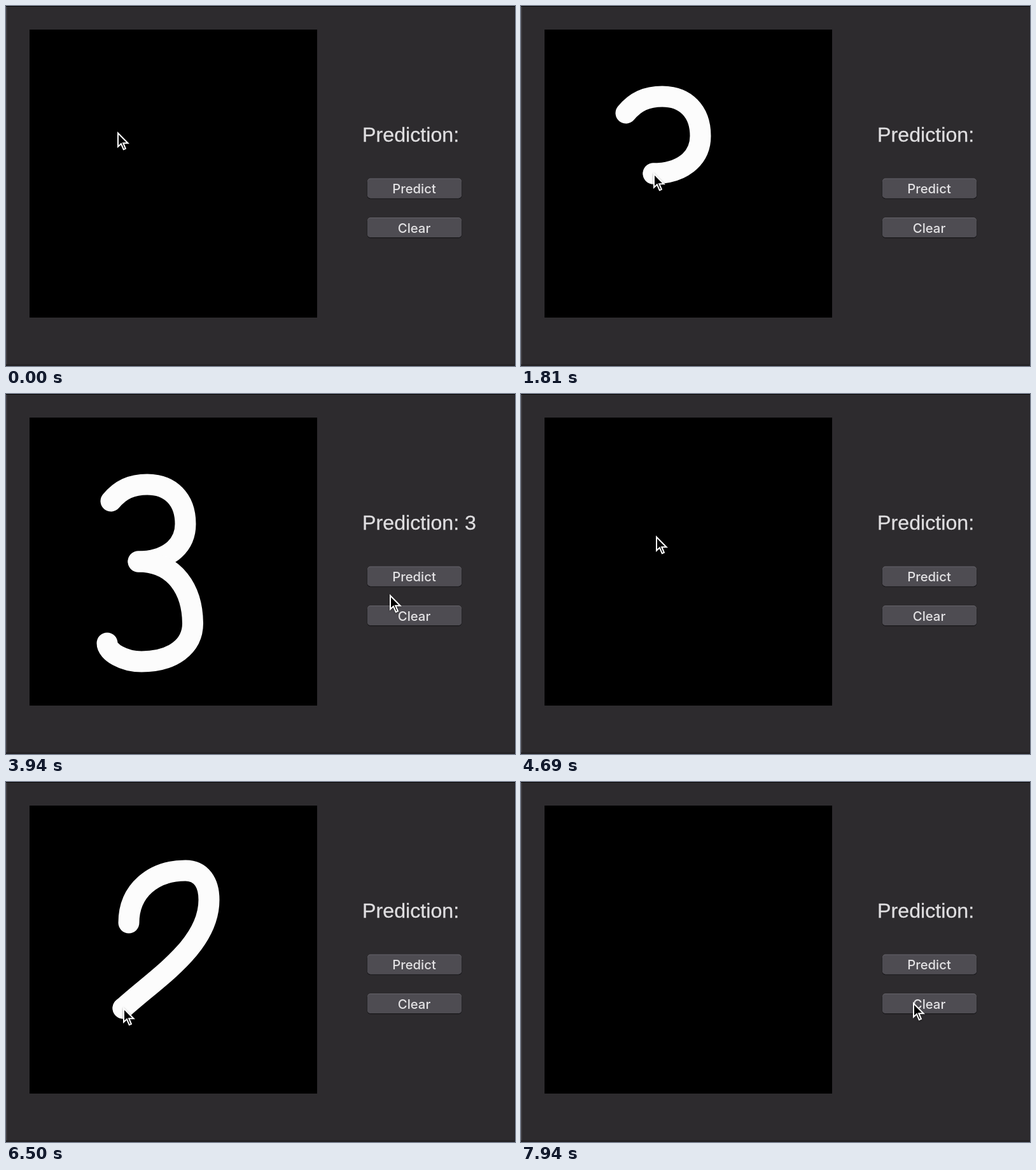
An HTML page that plays this animation: 800 px wide and 565 px high, repeating every 8 s.

```html
<!DOCTYPE html>
<html lang="en">
<head>
<meta charset="utf-8">
<title>Digit prediction</title>
<style>
  html, body { margin: 0; width: 100%; height: 100%; overflow: hidden; background: #2d2b2e; }
  svg { display: block; width: 800px; height: 565px; }
  .label { font: 32.2px "Liberation Sans", Arial, sans-serif; fill: #dfdee0; stroke: #dfdee0; stroke-width: .3; white-space: pre; }
  .button text { font: 500 20.3px Inter, Roboto, sans-serif; fill: #e3e2e4; text-anchor: middle; }
  .leg { fill: none; stroke: none; }
  .ink { stroke: #fcfcfc; stroke-width: 33; stroke-linecap: round; stroke-linejoin: round; }
  #cursor { filter: drop-shadow(0 1.5px 1.5px rgba(0, 0, 0, .4)); }
</style>
</head>
<body>
<svg viewBox="0 0 800 565">
  <rect width="800" height="565" fill="#2d2b2e"/>
  <rect width="1.5" height="565" fill="#444246"/>
  <rect y="562.5" width="800" height="2.5" fill="#232124"/>
  <rect x="799" width="1" height="565" fill="#232124"/>
  <rect width="800" height="1" fill="#050505"/>
  <rect x="37" y="37" width="452" height="452"/>
  <g id="legs"></g>

  <text class="label" id="label" x="560.1" y="213.4">Prediction:</text>

  <defs>
    <g id="face">
      <rect x="567.5" y="271.5" width="149" height="31.5" rx="5.5" fill="#1d1c1f"/>
      <rect x="568" y="270.5" width="148" height="31" rx="5" fill="#66646a"/>
      <rect x="568" y="271.5" width="148" height="30" rx="5" fill="#4e4c52"/>
    </g>
  </defs>
  <g class="button"><use href="#face"/><text x="641.5" y="294">Predict</text></g>
  <g class="button" transform="translate(0 61.5)"><use href="#face"/><text x="641.5" y="294">Clear</text></g>

  <g id="cursor">
    <path d="M1 1.5V22.8L5.9 18.3 9.8 27.2 12.9 25.8 9.2 17.2H16.6Z" fill="#000" stroke="#fff" stroke-width="2"/>
  </g>
</svg>
<script>
const LOOP = 8000, TICK = 62.5, INK_LAG = 0.4;
const byId = id => document.getElementById(id);
const cursor = byId('cursor'), label = byId('label');

const linear = u => u;
const easeOut = u => 1 - (1 - u) ** 2;
const easeInOut = u => u * u * (3 - 2 * u);

// Ticks at which each digit is predicted and cleared
const three = { value: 3, predicted: 60, cleared: 67 };
const two = { value: 2, predicted: 120, cleared: 127 };

const legs = [];
function addLeg(from, to, d, ease, digit) {
  const path = document.createElementNS('http://www.w3.org/2000/svg', 'path');
  path.setAttribute('d', d);
  path.setAttribute('class', digit ? 'leg ink' : 'leg');
  byId('legs').append(path);
  legs.push({ from, to, path, ease, digit, length: path.getTotalLength() });
}
const move = (from, to, d, ease = easeInOut) => addLeg(from, to, d, ease);
const write = (digit, from, to, d, ease = linear) => addLeg(from, to, d, ease, digit);

move(0, 10, 'M175 199L165 168', easeOut);
write(three, 10, 28.6, 'M165 168C180 150 197 142 222 142C258 142 282 165 282 204C282 240 252 263 208 263');
write(three, 29, 47.6, 'M208 263C266 263 293 308 293.5 360C293.5 396 262 420 213 420C185 420 159 405 159 391');
move(51, 59, 'M159 391Q400 340 605 284');
move(60, 66, 'M605 284L600 347');
move(70, 75, 'M600 347Q310 140 212 224');
move(75, 79, 'M212 224L193 221', easeOut);
write(two, 82, 103.6, 'M193 221C193 170 232 139 282 139C307 139 319 158 319 185C319 257 238 306 184 355');
write(two, 104, 109, 'M184 355Q290 356 380 340', easeOut);
move(112, 119, 'M380 340Q500 330 612 284');
move(121, 125, 'M612 284L616 347');

function distance(leg, tick) {
  const u = (tick - leg.from) / (leg.to - leg.from);
  return leg.length * leg.ease(Math.min(1, Math.max(0, u)));
}

// Frames start on whole hundredths of a second
function tickAt(ms) {
  const start = k => Math.round(k * TICK / 10) * 10;
  let k = Math.floor(ms / TICK) + 1;
  while (start(k) > ms) k--;
  return Math.min(k, LOOP / TICK - 1);
}

function draw(tick) {
  const current = legs.findLast(leg => leg.from <= tick);
  const tip = current.path.getPointAtLength(distance(current, tick));
  cursor.setAttribute('transform', `translate(${Math.round(tip.x)} ${Math.round(tip.y) - 1})`);

  for (const leg of legs.filter(leg => leg.digit)) {
    const shown = tick >= leg.from && tick < leg.digit.cleared;
    leg.path.style.display = shown ? '' : 'none';
    const inked = Math.max(0.1, distance(leg, tick - INK_LAG));
    leg.path.setAttribute('stroke-dasharray', `${inked} 2000`);
  }
  const digit = [three, two].find(d => tick >= d.predicted && tick < d.cleared);
  label.textContent = 'Prediction:' + (digit ? ' ' + digit.value : '');
}

const began = performance.now();
function loop() {
  draw(tickAt((performance.now() - began) % LOOP));
  requestAnimationFrame(loop);
}
loop();
</script>
</body>
</html>
```
